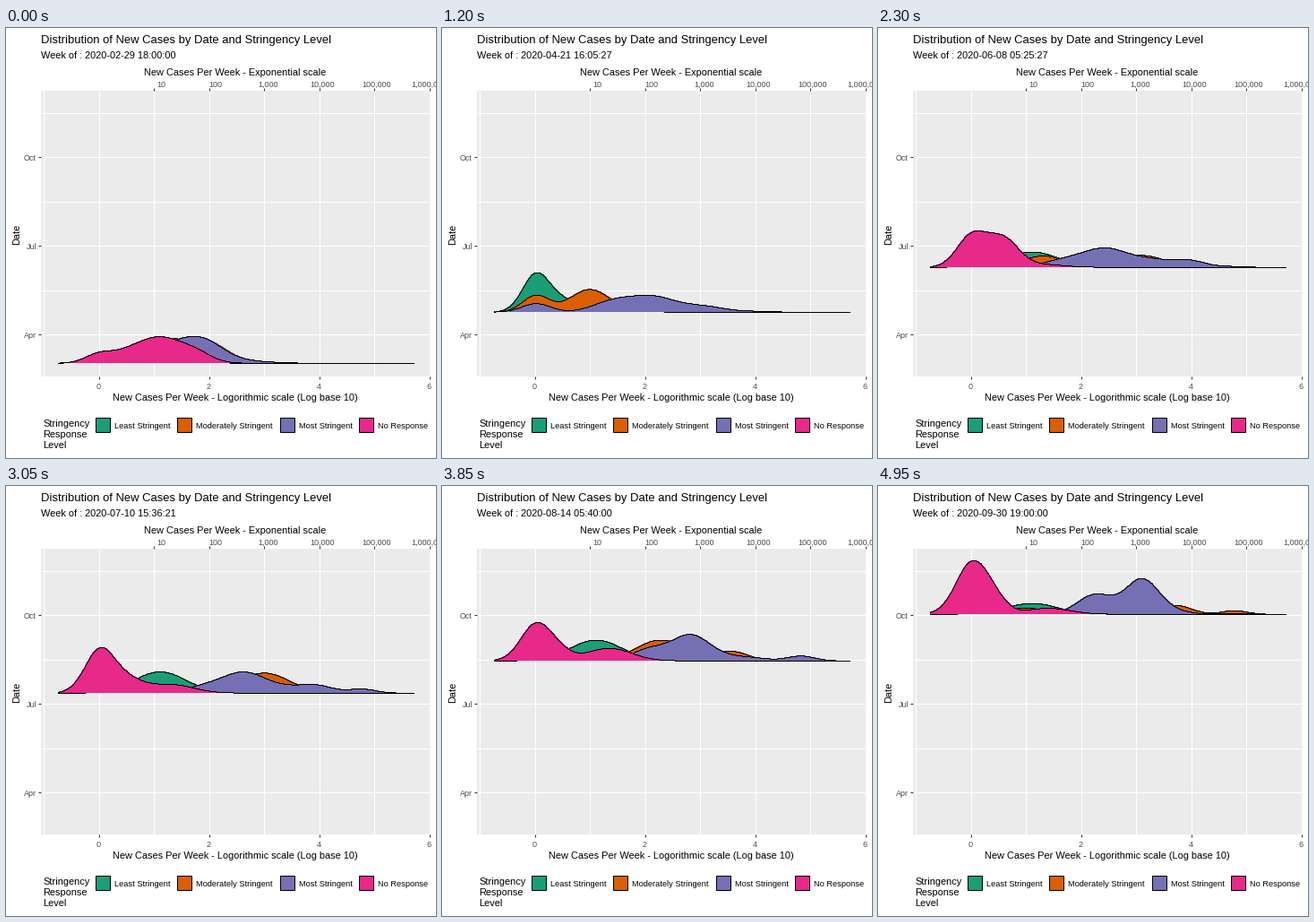
These frames come from a looping animation (480x480 px, 5 s). A matplotlib script:

```python
import numpy as np
import matplotlib.pyplot as plt
from matplotlib.animation import FuncAnimation

SIZE, FRAMES, INTERVAL = 480, 100, 50
LAST = FRAMES - 1
PX = 0.72  # points per pixel at 100 dpi
GREY, AXIS_TEXT, TICK = "#EBEBEB", "#4D4D4D", "#333333"
ZERO, UNIT = 102.6, 61.5  # pixel of log value 0, pixels per power of ten

plt.rcParams["font.family"] = "Liberation Sans"
plt.rcParams["path.simplify"] = False

# Month starts in days since 1 March, and the step that reaches each of them.
MONTHS = np.cumsum([0, 31, 30, 31, 30, 31, 31, 30])
DAYS = int(MONTHS[-1])
MONTH_STEPS = np.round(MONTHS * LAST / DAYS)
APRIL, JUNE = MONTH_STEPS[1], MONTH_STEPS[3]

xs = np.arange(58, 456) + 0.5


def wave(x, drift, spread, height, peak, life):
    """A cluster of counties that drifts while it grows and fades around a peak step."""
    def curve(step):
        centre = x + drift * step / LAST
        level = height * np.exp(-0.5 * ((step - peak) / life) ** 2)
        return level * np.exp(-0.5 * ((xs - centre) / spread) ** 2)
    return curve


LAYERS = {
    "Least Stringent": ("#1B9E77", [
        wave(105, 0, 15, 45, 20, 11),
        wave(133, 0, 14, 13, 16, 11),
        wave(187, 0, 20, 27, 0, 8),
        wave(172, 0, 29, 24.5, 68, 26),
    ]),
    "Moderately Stringent": ("#D95F02", [
        wave(105, 0, 15, 23, 16, 12),
        wave(143, 91, 22, 25, 25, 17),
        wave(160, 0, 30, 7, 99, 30),
        wave(219, 0, 25, 26.5, 0, 9),
        wave(310, -35, 26, 22, 60, 14),
        wave(239, 0, 23, 20.5, 79, 9),
        wave(310, 23, 17, 12, 90, 14),
        wave(398, 0, 14, 4, 99, 8),
    ]),
    "Most Stringent": ("#7570B3", [
        wave(105, 0, 16, 11, 16, 14),
        wave(150, 0, 35, 1.2, 80, 30),
        wave(175, 65, 22, 13, 5, 35),
        wave(195, 46, 19, 20, 99, 18),
        wave(216, 79, 25, 16, 0, 8),
        wave(216, 79, 25, 22, 70, 60),
        wave(216, 79, 16, 20, 99, 15),
        wave(275, 65, 24, 8, 40, 23),
        wave(348, 0, 18, 8, 54, 14),
        wave(385, 20, 15, 6, 71, 13),
    ]),
    "No Response": ("#E7298A", [
        wave(103, 0, 15, 9, 0, 5),
        wave(135, 0, 20, 9.5, 0, 5),
        wave(173, 0, 24, 27, 0, 5),
        wave(212, 0, 18, 10, 0, 5),
        wave(105, 0, 16.5, 48, 60, 18),
        wave(105, 0, 18, 57, 105, 15),
        wave(140, 0, 17, 31, 43, 12),
        wave(130, 0, 14, 12, 99, 25),
        wave(175, 15, 25, 14, 77, 18),
    ]),
}


def base_row(step):
    return int(374.4 - 1.0787 * np.interp(step, MONTH_STEPS, MONTHS))


def stamp(step):
    """Local time of a step; clocks go forward on 8 March."""
    t = np.datetime64("2020-02-29T18:00:00")
    t = t + np.timedelta64(step * DAYS * 86400 // LAST, "s")
    if t >= np.datetime64("2020-03-08T02:00:00"):
        t = t + np.timedelta64(1, "h")
    return "Week of : " + str(t).replace("T", " ")


fig = plt.figure(figsize=(4.8, 4.8), dpi=100, facecolor="white")
ax = fig.add_axes([0, 0, 1, 1])
ax.set_xlim(0, SIZE)
ax.set_ylim(SIZE, 0)
ax.axis("off")


def rect(x, y, w, h, color, edge="none"):
    ax.add_patch(plt.Rectangle((x, y), w, h, facecolor=color, edgecolor=edge,
                               linewidth=PX, zorder=1))


def line(x, y, color):
    ax.plot(x, y, color=color, lw=PX, solid_capstyle="butt", zorder=2)


def text(x, y, s, size, color="black", ha="left", va="baseline", **kw):
    return ax.text(x, y, s, fontsize=size * PX, color=color, ha=ha, va=va, **kw)


# Panel, grid and ticks
rect(39, 70, 435, 319, GREY)
for k in range(-1, 7):
    x = round(ZERO + UNIT * k) + 0.5
    line([x, x], [70, 389], "white")
    if k % 2 == 0:
        line([x, x], [389, 392], TICK)
        text(x, 403, str(k), 9, AXIS_TEXT, "center")
    if k > 0:
        # Labels are padded to the width of the longest, which shifts short ones right.
        label = f"{10 ** k:,}"
        line([x, x], [67, 70], TICK)
        text(x + 1.3 * (9 - len(label)), 66, label, 9, AXIS_TEXT, "center")
for k, month in enumerate(("", "Oct", "", "Jul", "", "Apr", "")[:-1]):
    y = int(94 + 49.5 * k) + 0.5
    line([39, 474], [y, y], "white")
    if month:
        line([36, 39], [y, y], TICK)
        text(34, y + 4.5, month, 9, AXIS_TEXT, "right")

# Titles
text(39, 17, "Distribution of New Cases by Date and Stringency Level", 13)
subtitle = text(39, 34, "", 11)
text(256, 53, "New Cases Per Week - Exponential scale", 11, ha="center")
text(255.5, 416, "New Cases Per Week - Logorithmic scale (Log base 10)", 11, ha="center")
text(17, 230, "Date", 11, ha="right", va="center", rotation=90)

# Legend
for k, word in enumerate(("Stringency", "Response", "Level")):
    text(41, 445 + 12 * k, word, 11)
for x, (name, (color, _)) in zip((99, 190, 305, 393), LAYERS.items()):
    rect(x + 0.5, 434.5, 16, 16, color, "black")
    text(x + 22, 447, name, 9.3)

# Ridges, later layers in front
ridges = []
for k, (name, (color, waves)) in enumerate(LAYERS.items()):
    fill, = ax.fill([0, 1, 1], [0, 0, 1], facecolor=color, edgecolor="none",
                    antialiased=False, zorder=3 + k)
    outline, = ax.plot([], [], color="black", lw=PX, zorder=3.5 + k)
    ridges.append((name, waves, fill, outline))


def draw(step):
    subtitle.set_text(stamp(step))
    for name, waves, fill, outline in ridges:
        at, shown = step, True
        if name == "No Response":
            # Rests on 1 March, is gone in April and May, then returns.
            at = 0 if step < APRIL else step
            shown = step < APRIL or step >= JUNE
        base = base_row(at)
        rows = base - np.round(sum(w(at) for w in waves) + 0.3)
        fill.set_xy(np.column_stack([np.r_[xs, xs[-1], xs[0]],
                                     np.r_[rows, base, base]]))
        outline.set_data(xs, rows + 0.5)
        fill.set_visible(shown)
        outline.set_visible(shown)


anim = FuncAnimation(fig, draw, frames=FRAMES, interval=INTERVAL,
                     repeat=True, repeat_delay=0, blit=False)
plt.show()
```
